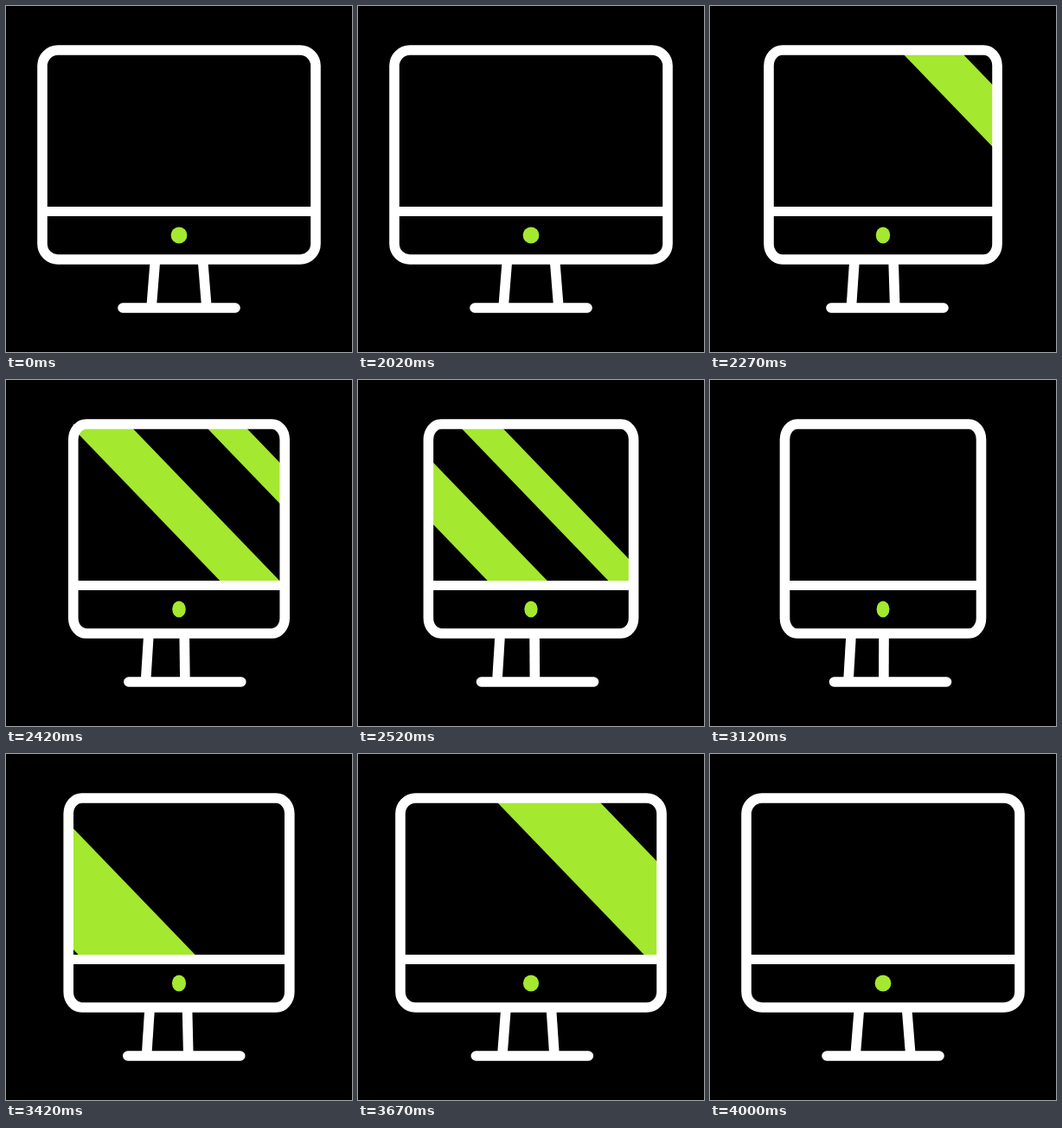
An HTML page with a canvas for the animation above (4020 ms loop, 400 by 400 pixels).

```html
<!DOCTYPE html>
<html lang="en">
<head>
<meta charset="utf-8">
<title>Turning monitor</title>
<style>
html, body { margin: 0; width: 100%; height: 100%; overflow: hidden; background: #000; }
canvas { display: block; width: 100vw; height: 100vh; }
</style>
</head>
<body>
<canvas id="stage" width="400" height="400"></canvas>
<script>
const ctx = document.getElementById('stage').getContext('2d');
const LOOP = 4020, TURN = 2020, BACK = 3020, SPAN = 1000;
const WHITE = '#fff', GREEN = '#a4e82f';
const TOP = 51, BOTTOM = 293, SHELF = 237.5, LINE = 11.6;
const SLANT = 0.964;

// cubic-bezier(a, 0, b, 1)
function ease(x, a, b) {
  if (x <= 0) return 0;
  if (x >= 1) return 1;
  let lo = 0, hi = 1, s = 0.5;
  for (let i = 0; i < 24; i++) {
    s = (lo + hi) / 2;
    const r = 1 - s;
    if (3 * a * s * r * r + 3 * b * s * s * r + s * s * s < x) lo = s;
    else hi = s;
  }
  return s * s * (3 - 2 * s);
}

function turnAt(t) {
  return t < BACK
    ? ease((t - TURN) / SPAN, 0.25, 0)
    : 1 - ease((t - BACK) / SPAN, 0.57, 0.35);
}

function line(x1, y1, x2, y2, cap) {
  ctx.lineCap = cap || 'butt';
  ctx.beginPath();
  ctx.moveTo(x1, y1);
  ctx.lineTo(x2, y2);
  ctx.stroke();
}

// Diagonal band; a and b are its edges along the screen's top (y = 57)
function band(a, b) {
  const y1 = 45, y2 = 245;
  const d1 = (y1 - 57) * SLANT, d2 = (y2 - 57) * SLANT;
  ctx.beginPath();
  ctx.moveTo(a + d1, y1);
  ctx.lineTo(b + d1, y1);
  ctx.lineTo(b + d2, y2);
  ctx.lineTo(a + d2, y2);
  ctx.fill();
}

function shine(t, left) {
  ctx.save();
  ctx.beginPath();
  ctx.rect(left, TOP, 400 - 2 * left, SHELF - TOP);
  ctx.clip();
  ctx.fillStyle = GREEN;
  if (t >= TURN && t < BACK) {
    const d = t - 2420;
    band(79.5 - 0.975 * d, 148.5 - 0.975 * d);
    band(235 - 1.132 * d, 280.5 - 1.108 * d);
  } else if (t >= BACK) {
    const d = t - 3420;
    band(-86 + 0.988 * d, 49 + 0.924 * d);
  }
  ctx.restore();
}

function casing(left, rx, ry) {
  const right = 400 - left, k = 0.448;
  ctx.beginPath();
  ctx.moveTo(left + rx, TOP);
  ctx.lineTo(right - rx, TOP);
  ctx.bezierCurveTo(right - rx * k, TOP, right, TOP + ry * k, right, TOP + ry);
  ctx.lineTo(right, BOTTOM - ry);
  ctx.bezierCurveTo(right, BOTTOM - ry * k, right - rx * k, BOTTOM, right - rx, BOTTOM);
  ctx.lineTo(left + rx, BOTTOM);
  ctx.bezierCurveTo(left + rx * k, BOTTOM, left, BOTTOM - ry * k, left, BOTTOM - ry);
  ctx.lineTo(left, TOP + ry);
  ctx.bezierCurveTo(left, TOP + ry * k, left + rx * k, TOP, left + rx, TOP);
  ctx.closePath();
  ctx.stroke();
}

function draw(t) {
  const p = turnAt(t), left = 42 + 45 * p;
  ctx.fillStyle = '#000';
  ctx.fillRect(0, 0, 400, 400);
  shine(t, left);

  ctx.strokeStyle = WHITE;
  ctx.lineWidth = 11;
  line(left, SHELF, 400 - left, SHELF);
  ctx.lineWidth = LINE;
  line(172.3 - 9.4 * p, 296, 168.3 - 8.3 * p, 346);
  line(227.7 - 27 * p, 296, 231.7 - 31.2 * p, 346);
  line(135 + 8.6 * p, 349, 265 + 8.6 * p, 349, 'round');
  casing(left, 18 - 4 * p, 18);

  ctx.fillStyle = GREEN;
  ctx.beginPath();
  ctx.ellipse(200, 265, 9.4 - 2 * p, 9.4, 0, 0, 2 * Math.PI);
  ctx.fill();
}

const start = performance.now();
function tick() {
  draw((performance.now() - start) % LOOP);
  requestAnimationFrame(tick);
}
tick();
</script>
</body>
</html>
```
